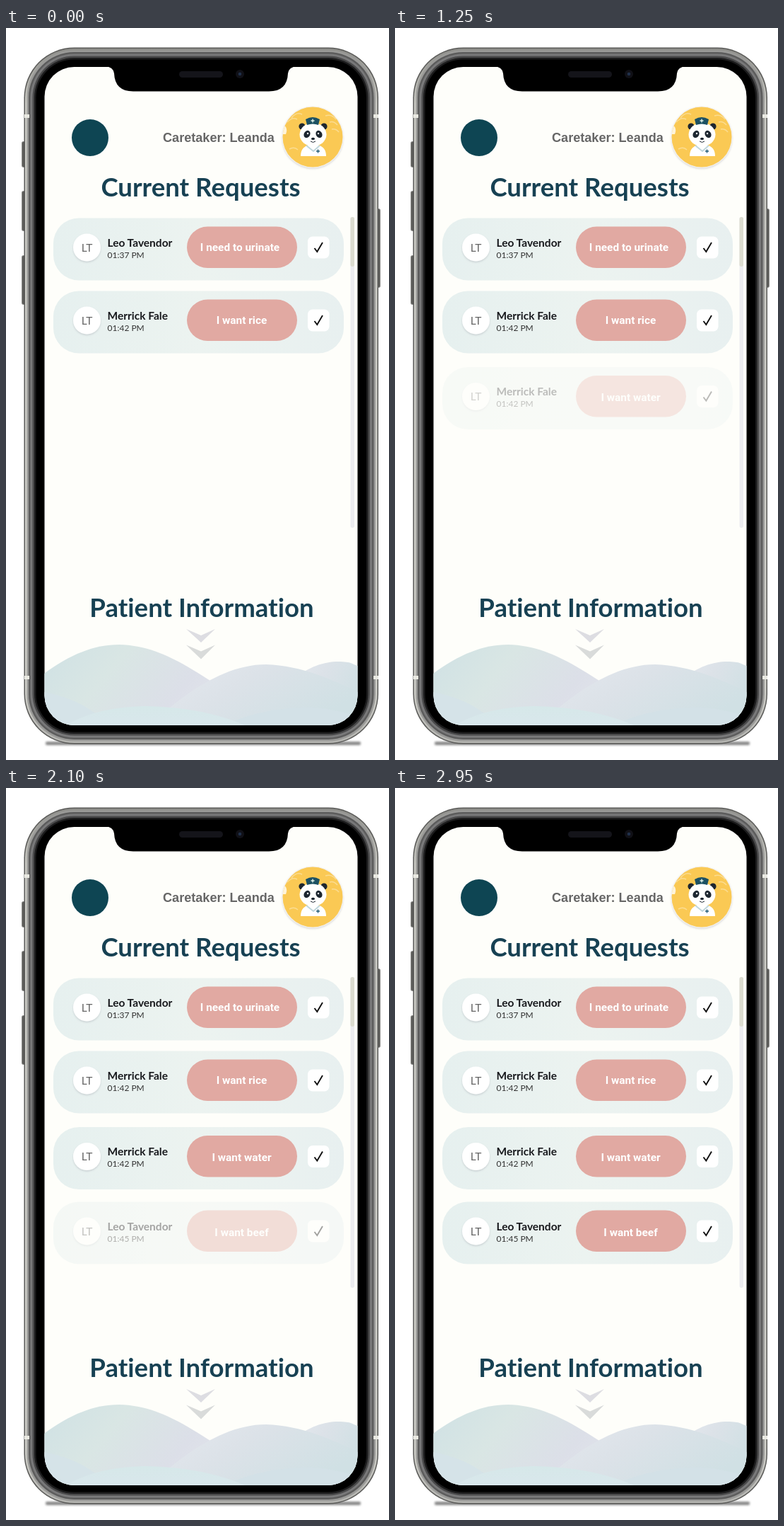
Recreate the animation shown at these times as an HTML page. Size 542 by 1034 pixels, loop 3 s.

```html
<!DOCTYPE html>
<html lang="en">
<head>
<meta charset="utf-8">
<title>Caretaker requests</title>
<style>
html, body { margin: 0; width: 100%; height: 100%; overflow: hidden; background: #fff; }
svg { display: block; width: 100%; height: 100%; }
text { font-family: Lato, "Open Sans", sans-serif; font-variant-ligatures: none; }
.title { font-size: 36.6px; font-weight: 700; fill: #174153; text-anchor: middle; }
.carer { font: 700 18.1px "Liberation Sans", Arial, sans-serif; fill: #666; }
.name { font-size: 15.5px; font-weight: 700; fill: #18191d; }
.time { font-size: 12px; fill: #333; }
.initials { font-size: 15.5px; fill: #666; text-anchor: middle; }
.ask { font: 700 15.4px Roboto, sans-serif; fill: #fff; text-anchor: middle; }
.third { animation: third 3s infinite; }
.fourth { animation: fourth 3s infinite; }
/* fades advance every 50 ms */
@keyframes third {
  0% { opacity: 0; animation-timing-function: step-end; }
  35% { opacity: 0; animation-timing-function: steps(14, end); }
  58.3333%, 100% { opacity: 1; }
}
@keyframes fourth {
  0% { opacity: 0; animation-timing-function: step-end; }
  61.6667% { opacity: 0; animation-timing-function: steps(13, end); }
  83.3333%, 100% { opacity: 1; }
}
</style>
</head>
<body>
<svg viewBox="0 0 542 1034" preserveAspectRatio="none">
  <defs>
    <linearGradient id="card">
      <stop offset="0" stop-color="#e6f0ef"/><stop offset=".5" stop-color="#ecf3f0"/>
      <stop offset="1" stop-color="#e8f0f0"/>
    </linearGradient>
    <linearGradient id="hillA" x2="1" y2=".35">
      <stop offset="0" stop-color="#cfe1e4"/><stop offset=".4" stop-color="#d9e6e4"/>
      <stop offset=".8" stop-color="#dcdfe8"/><stop offset="1" stop-color="#e0e3ea"/>
    </linearGradient>
    <linearGradient id="hillB" x2="1" y2=".5">
      <stop offset="0" stop-color="#e4e8ee"/><stop offset=".45" stop-color="#dce2e8"/>
      <stop offset="1" stop-color="#d0e0e4"/>
    </linearGradient>
    <linearGradient id="hillC" x2="0" y2="1">
      <stop offset="0" stop-color="#d6e8e9"/><stop offset="1" stop-color="#d9e7ec"/>
    </linearGradient>
    <linearGradient id="metal" x2="0" y2="1">
      <stop offset="0" stop-color="#8d8d89"/><stop offset=".08" stop-color="#cacac4"/>
      <stop offset=".92" stop-color="#cfcfc9"/><stop offset="1" stop-color="#b4b4b0"/>
    </linearGradient>
    <filter id="soft" x="-30%" y="-30%" width="160%" height="170%">
      <feDropShadow dx="0" dy="1.5" stdDeviation="1.2" flood-color="#667" flood-opacity=".24"/>
    </filter>
    <filter id="blur" x="-10%" y="-100%" width="120%" height="300%"><feGaussianBlur stdDeviation="1.4"/></filter>
    <clipPath id="screen"><rect x="54.5" y="55" width="443" height="930" rx="42"/></clipPath>
    <clipPath id="disc"><circle cx="434" cy="154" r="42.500"/></clipPath>
  </defs>

  <rect width="542" height="1034" fill="#fff"/>
  <rect x="56" y="1008" width="446" height="5" rx="2" fill="#8a8a8a" filter="url(#blur)"/>
  <g fill="#5c5c5a" stroke="#91918e">
    <rect x="22.5" y="160.500" width="6" height="36" rx="2"/>
    <rect x="22.5" y="230.5" width="6" height="56" rx="2"/>
    <rect x="22.5" y="321.5" width="6" height="69" rx="2"/>
    <rect x="523.5" y="255.5" width="6" height="111" rx="2"/>
  </g>
  <g id="body"></g>
  <path d="M26 124.500h7M520 124.500h7M26 917.500h7M520 917.500h7" stroke="#e9e9e2" stroke-width="5"/>
  <g clip-path="url(#screen)">
    <rect x="54" y="55" width="444" height="930" fill="#fefefa"/>
    <path d="M405 920C430 902 450 895 470 895S490 899 498 901V985H405Z" fill="url(#hillB)"/>
    <path d="M54 912C90 885 125 871 160 871C210 872 250 897 289 922L330 985H54Z" fill="url(#hillA)"/>
    <path d="M222 968C265 932 315 899 368 899C420 901 460 920 498 938V985H222Z" fill="url(#hillB)"/>
    <path d="M54 938C80 943 105 952 126 968L145 985H54Z" fill="#d5e3e8"/>
    <path d="M310 985C345 967 390 960 425 960S475 967 498 972V985Z" fill="#d3e1e7"/>
    <path d="M85 985C115 967 155 958 200 958C250 959 300 968 338 985Z" fill="url(#hillC)"/>

    <circle cx="119" cy="155" r="26" fill="#0e4553"/>
    <text class="carer" x="222" y="161">Caretaker: Leanda</text>

    <circle cx="434" cy="154" r="43.500" fill="#f3f1ee" filter="url(#soft)"/>
    <g clip-path="url(#disc)">
      <rect x="390" y="110" width="90" height="90" fill="#fac954"/>
      <path d="M398 133q7-8 14-4M404 127q7-9 15-5M452 124q9-3 15 5M458 133q6-2 11 4M461 143q6-1 10 4M401 171q7-4 12 1" fill="none" stroke="#fbdc91" stroke-width="1.500"/>
      <path d="M391 135q9 6 5 15h-6Z" fill="#fff4d8"/>
      <path d="M417 181q0-13 12-16h12q12 3 12 16Z" fill="#fff"/>
      <path d="M425 166l10 8 9-8" fill="none" stroke="#bfd6dc" stroke-width="2"/>
      <path d="M441.500 171.500v5M439 174h5" stroke="#28607a" stroke-width="1.5"/>
      <g fill="#1d2630">
        <circle cx="419" cy="139" r="4.600"/><circle cx="450" cy="139" r="4.600"/>
      </g>
      <ellipse cx="434.500" cy="150.500" rx="19" ry="16.500" fill="#fff"/>
      <g fill="#1d2630">
        <ellipse cx="426" cy="150" rx="4.300" ry="5.500" transform="rotate(28 426 150)"/>
        <ellipse cx="443" cy="150" rx="4.300" ry="5.500" transform="rotate(-28 443 150)"/>
        <ellipse cx="434.500" cy="156.500" rx="2.500" ry="1.700"/>
      </g>
      <path d="M431 160q3.500 3 7 0" fill="none" stroke="#1d2630"/>
      <circle cx="427" cy="149" r="1.200" fill="#fff"/><circle cx="442" cy="149" r="1.200" fill="#fff"/>
      <path d="M424 129q10-6 20 0l-2 8q-8-3-16 0Z" fill="#1c5163"/>
      <path d="M434 128.500v5M431.500 131h5" stroke="#dff0e8" stroke-width="1.400"/>
    </g>

    <text class="title" x="275.500" y="237.500">Current Requests</text>
    <g id="rows"></g>
    <rect x="487.500" y="267" width="5.500" height="439" rx="2.700" fill="#ececef"/>
    <rect x="487.500" y="267" width="5.500" height="70" rx="2.700" fill="#dcdcd0"/>
    <text class="title" x="277" y="831.500">Patient Information</text>
    <path d="M255 849l21 9 20-9-20 19Z" fill="#dddde2"/>
    <path d="M255 871.500l21 9 20-9-20 20Z" fill="#d9dbda"/>
  </g>
  <path d="M140 54Q152 55 153 64Q154 89.500 180 89.500H372Q398 89.500 399 64Q400 55 412 54Z" fill="#000"/>
  <rect x="245" y="61" width="62" height="9" rx="4.500" fill="#14141a"/>
  <circle cx="331" cy="65" r="6" fill="#101016"/>
  <circle cx="331" cy="65" r="2.300" fill="#20304a"/>
</svg>
<script>
// bezel rings, outside in
const rings = [
  [0, '#5a5a58'], [1.5, 'url(#metal)'], [4, '#9a9a98'], [6.5, '#5c5c5c'],
  [9, '#79797a'], [12, '#4a4a4b'], [14.5, '#1c1c1d'], [17, '#000']
];
document.getElementById('body').innerHTML = rings.map(([inset, fill]) =>
  `<rect x="${25.5 + inset}" y="${27.5 + inset}" width="${501.5 - 2 * inset}" height="${984 - 2 * inset}" rx="${71 - inset}" fill="${fill}"/>`
).join('');

const row = ({ y, name, time, ask, askX = 333.5, drop = 0, cls = '' }) => `
  <g class="${cls}"><g transform="translate(0 ${y})">
    <rect x="67" width="411" height="88" rx="36" fill="url(#card)"/>
    <circle cx="114.5" cy="41.500" r="19.500" fill="#fff" filter="url(#soft)"/>
    <text class="initials" x="114.5" y="47">LT</text>
    <text class="name" x="143.500" y="40">${name}</text>
    <text class="time" x="143.500" y="56">${time} PM</text>
    <rect x="256" y="12" width="156" height="58.500" rx="29.200" fill="#e1a9a2"/>
    <text class="ask" x="${askX}" y="${46.500 + drop}">${ask}</text>
    <rect x="427" y="26" width="30.500" height="31" rx="7" fill="#fff"/>
    <path d="M436.500 42.500L440.300 47.500L448 34.500" fill="none" stroke="#111" stroke-width="1.900"/>
  </g></g>`;

const leo = 'Leo Tavendor', merrick = 'Merrick Fale';
document.getElementById('rows').innerHTML = [
  { y: 268.5, name: leo, time: '01:37', ask: 'I need to urinate', askX: 331 },
  { y: 371.5, name: merrick, time: '01:42', ask: 'I want rice' },
  { y: 479, name: merrick, time: '01:42', ask: 'I want water', drop: 1.5, cls: 'third' },
  { y: 584.5, name: leo, time: '01:45', ask: 'I want beef', drop: 2, cls: 'fourth' }
].map(row).join('');
</script>
</body>
</html>
```
